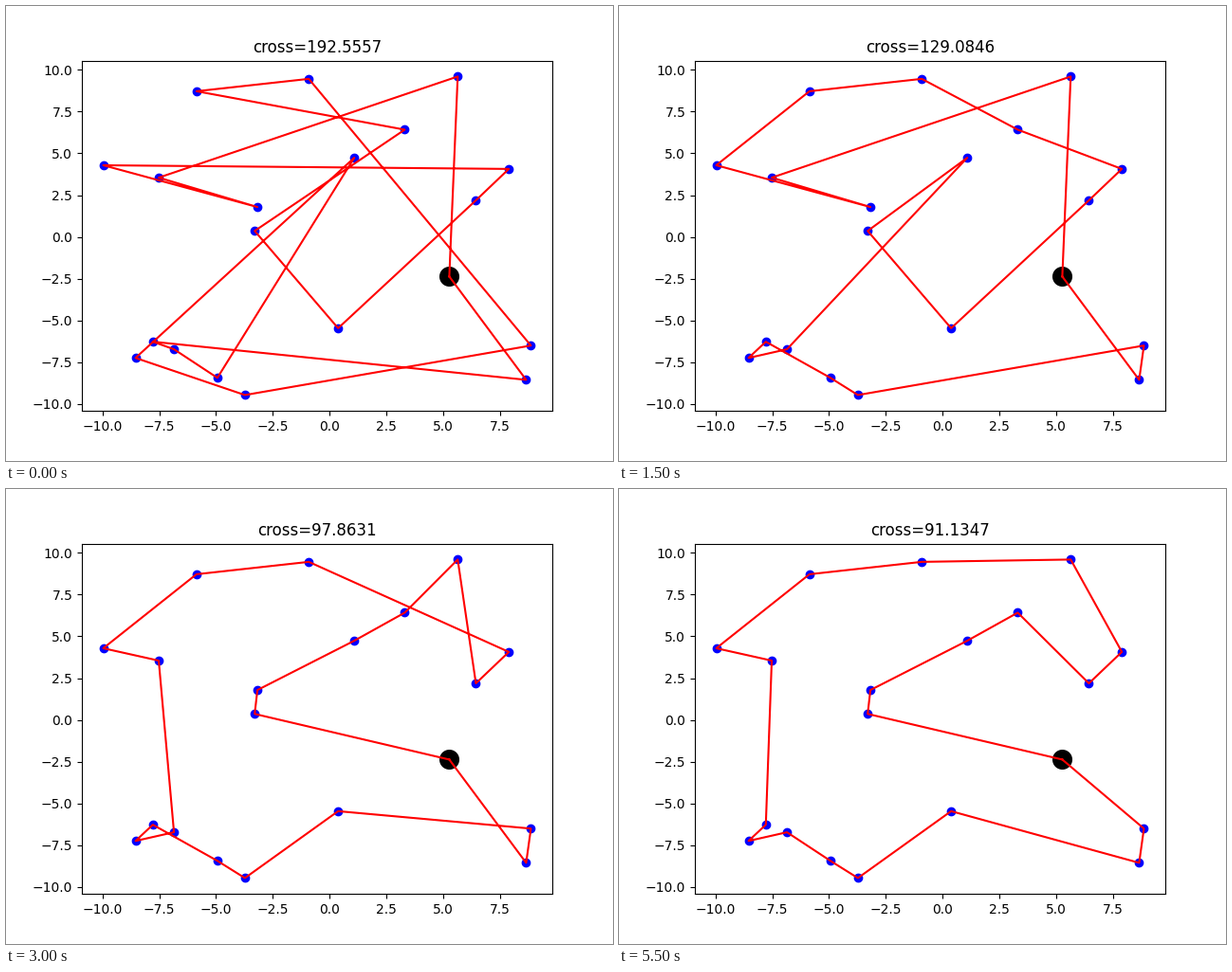
These frames come from a looping animation (640x480 px, 8500 ms). A matplotlib script:

```python
import matplotlib.pyplot as plt
import numpy as np
from matplotlib.animation import FuncAnimation

CITIES = {
    "A": (-5.86, 8.72), "B": (-0.92, 9.46), "C": (5.63, 9.60), "D": (3.30, 6.42),
    "E": (1.08, 4.74), "F": (7.88, 4.07), "G": (6.43, 2.19), "H": (-9.96, 4.29),
    "I": (-7.52, 3.55), "J": (-3.18, 1.79), "K": (-3.30, 0.36), "L": (5.26, -2.37),
    "M": (0.37, -5.46), "N": (8.85, -6.50), "O": (8.64, -8.55), "P": (-7.78, -6.27),
    "Q": (-6.85, -6.72), "R": (-8.54, -7.24), "S": (-4.94, -8.43), "T": (-3.73, -9.46),
}

# Best round trip found so far and its length, one entry per step
TOURS = [
    ("LCIJHFGMKDABNTRESQPO", 192.5557),
    ("LCIJHFGMKDABENTRSQPO", 166.5712),
    ("LCIJHFGMKDABEQRPSTNO", 147.7854),
    ("LCIJHABDFGMKEQRPSTNO", 129.0846),
    ("LKJPQEGFDCBHAIRTSMNO", 121.8374),
    ("LKJCEDGFBAIHQRPSTMNO", 105.4366),
    ("LKJEDCGFBAHIQRPSTMNO", 97.8631),
    ("LKJEGFDCBAHIQRPSTMNO", 94.9422),
    ("LKJEGFDCBAHIPQRSTMNO", 94.4926),
    ("LKJEDGFCBAHIQRPSTMNO", 93.9011),
    ("LKJEDGFCBAHIQRPSTMON", 92.6057),
    ("LKJEDGFCBAHIPRQSTMON", 91.1347),
]
STEP_MS = 500
FRAMES = 17  # the last tour is held until the loop ends

fig, ax = plt.subplots(figsize=(6.4, 4.8), dpi=100)
xy = np.array(list(CITIES.values()))
ax.scatter(xy[:, 0], xy[:, 1], color="blue")
ax.scatter(*CITIES["L"], s=200, color="black")
line, = ax.plot([], [], color="red")
title = ax.set_title("")


def update(i):
    tour, length = TOURS[min(i, len(TOURS) - 1)]
    path = np.array([CITIES[c] for c in tour + tour[0]])
    line.set_data(path[:, 0], path[:, 1])
    title.set_text(f"cross={length:.4f}")
    return line, title


anim = FuncAnimation(fig, update, frames=FRAMES, interval=STEP_MS,
                     repeat=True, repeat_delay=0, blit=False)
plt.show()
```
